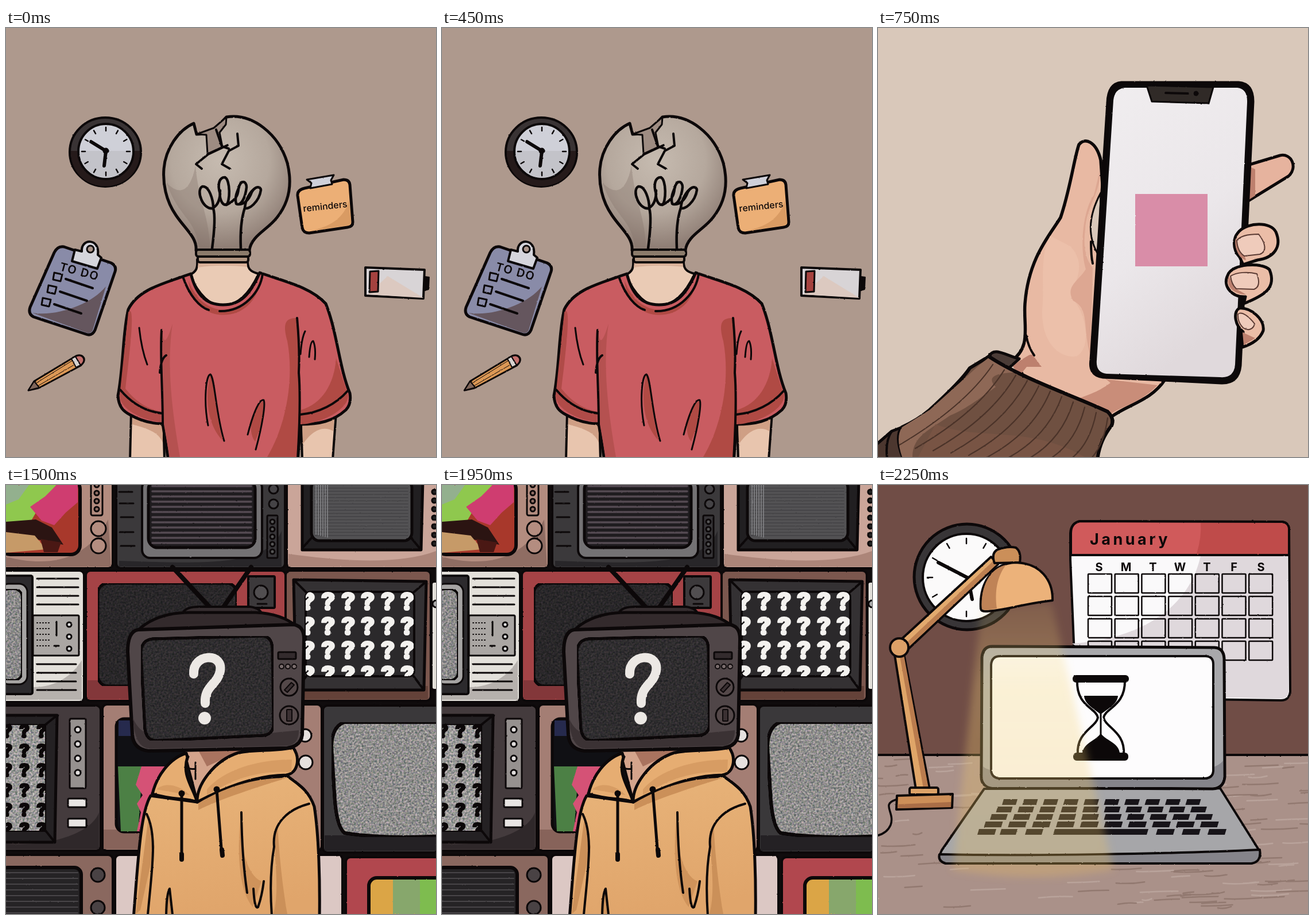
Recreate the animation shown at these times as an HTML page. Size 749 px wide and 747 px high, loop 3000 ms.

```html
<!DOCTYPE html>
<html lang="en">
<head>
<meta charset="utf-8">
<style>
html, body { margin: 0; width: 100%; height: 100%; overflow: hidden; }
svg { display: block; width: 100vw; height: 100vh; }
.scene { stroke: #0c0809; stroke-linecap: round; stroke-linejoin: round; filter: url(#rough); }
text { fill: #0c0809; stroke: none; text-anchor: middle; font-family: Inter, "Noto Sans", sans-serif; }
</style>
</head>
<body>
<svg id="stage" viewBox="0 0 749 747"></svg>
<script>
const path = (d, fill = 'none', w = 4, extra = '') =>
  `<path d="${d}" fill="${fill}" stroke-width="${w}" ${extra}/>`;
const shade = (d, fill) => path(d, fill, 0);
const box = (x0, y0, x1, y1, fill, r = 8, w = 4, extra = '') =>
  `<rect x="${x0}" y="${y0}" width="${x1 - x0}" height="${y1 - y0}" rx="${r}" fill="${fill}" stroke-width="${w}" ${extra}/>`;
const dot = (x, y, r, fill, w = 3) =>
  `<circle cx="${x}" cy="${y}" r="${r}" fill="${fill}" stroke-width="${w}"/>`;
const label = (s, x, y, size, extra = '') =>
  `<text x="${x}" y="${y}" font-size="${size}" ${extra}>${s}</text>`;
const repeat = (n, make) => Array.from({ length: n }, (_, i) => make(i)).join('');
const rules = (x0, x1, y, step, n, w = 3) =>
  path(repeat(n, i => `M${x0} ${y + i * step}H${x1}`), 'none', w);
const ticks = (x, y, r, len) => path(repeat(12, i => {
  const c = Math.cos(i * Math.PI / 6), s = Math.sin(i * Math.PI / 6);
  return `M${x + r * c} ${y + r * s}L${x + (r - len) * c} ${y + (r - len) * s}`;
}), 'none', 2.5);
const snow = 'filter="url(#snow)"';

let seed = 7;
const random = () => (seed = seed * 16807 % 2147483647) / 2147483647;

const defs = `<defs>
  <filter id="rough" filterUnits="userSpaceOnUse" x="0" y="0" width="749" height="747" color-interpolation-filters="sRGB">
    <feTurbulence type="fractalNoise" baseFrequency=".2" numOctaves="2"/>
    <feDisplacementMap in="SourceGraphic" scale="1.8" xChannelSelector="R" yChannelSelector="G"/>
  </filter>
  <filter id="snow" x="0" y="0" width="1" height="1" color-interpolation-filters="sRGB">
    <feTurbulence type="fractalNoise" baseFrequency=".3" numOctaves="3"/>
    <feColorMatrix values="1 0 0 0 0 .8 .2 0 0 0 .8 0 .2 0 0 0 0 0 0 1"/>
    <feComposite in2="SourceGraphic" operator="arithmetic" k1="1.3" k3=".35"/>
  </filter>
  <filter id="soft"><feGaussianBlur stdDeviation="7"/></filter>
  <radialGradient id="glass" cx=".45" cy=".33" r=".65">
    <stop offset="0" stop-color="#c6bbb0"/><stop offset=".6" stop-color="#b5a89d"/><stop offset="1" stop-color="#8f7e75"/>
  </radialGradient>
  <linearGradient id="screen" x2=".4" y2="1"><stop stop-color="#f0edef"/><stop offset=".6" stop-color="#ebe7ea"/><stop offset="1" stop-color="#e0d9dc"/></linearGradient>
  <linearGradient id="cloth" x2=".2" y2="1"><stop stop-color="#e8b47a"/><stop offset="1" stop-color="#e0a56b"/></linearGradient>
  <linearGradient id="beam" x2="0" y2="1"><stop stop-color="#f5d67a" stop-opacity=".12"/>
    <stop offset=".3" stop-color="#f5d67a" stop-opacity=".3"/><stop offset="1" stop-color="#f0c05c" stop-opacity=".28"/></linearGradient>
  <clipPath id="marksA"><rect x="522" y="186" width="188" height="147" rx="9"/></clipPath>
  <clipPath id="marksB"><rect x="-9" y="416" width="79" height="188" rx="9"/></clipPath>
  <clipPath id="cuff"><path d="M193 572C250 610 340 640 400 668Q412 680 407 692L383 747H42Q30 712 42 695L90 665Z"/></clipPath>
</defs>`;

// Broken bulb
const wallClock = `
  <ellipse cx="173" cy="216" rx="62" ry="60" fill="#393334" stroke-width="4"/>
  ${shade('M113 214H233C234 296 112 296 113 214Z', '#251a1a')}
  ${dot(174, 215, 48, '#cfd0d8', 4)}${shade('M128 214H220C216 276 132 276 128 214Z', '#c3c3c9')}
  ${ticks(174, 215, 42, 6)}${path('M174 214L148 198M174 214L171 240', 'none', 6)}${dot(174, 214, 5, '#0c0809', 1)}`;

const clipboard = `
  ${path('M101 381L183 409Q193 414 190 424L155 526Q150 537 139 533L48 503Q38 498 42 486L84 391Q90 379 101 381Z', '#898ba8', 5)}
  ${shade('M46 496C90 503 150 480 174 450L151 526Q148 533 139 530Z', '#65565e')}
  ${path('M115 406L120 386L132 389C130 366 164 365 160 395L166 400L159 419Z', '#d5d5dc')}${dot(147, 385, 6, '#aa9489')}
  ${label('TO DO', 128, 431, 20, 'transform="rotate(15 128 424)" font-weight="600" letter-spacing="1.5"')}
  ${repeat(3, i => { const x = 84 - i * 10, y = 426 + i * 22; return path(`M${x} ${y}L${x + 14} ${y + 3}L${x + 11} ${y + 15}L${x - 2} ${y + 12}Z`, 'none', 3)
    + path(`M${x + 20} ${y + 11}L${x + 67} ${y + 27}`, 'none', 4); })}`;

const desktopItems = `
  ${path('M520 279L588 264Q598 264 599 273L604 338Q604 346 595 347L528 357Q518 357 516 348L508 292Q507 282 520 279Z', '#ecaf76', 5)}
  ${shade('M597 300L601 337Q601 343 594 344L530 353C563 347 590 331 597 300Z', '#d99b63')}
  ${path('M524 264L571 256L566 265L568 272L530 279L532 270Z', '#cfd0d9', 3)}
  ${label('reminders', 556, 316, 16, 'transform="rotate(-6 556 311)" font-weight="500"')}
  ${path('M626 417L729 421L727 471L626 466Z', '#d8d4d6')}${shade('M665 432L727 470L630 464Z', '#dcc9c0')}
  ${path('M634 424L649 423L648 459L633 460Z', '#a5423f', 3)}${path('M730 433L737 434L736 455L729 457Z', '#0c0809', 2)}
  ${path('M39 631L49 615L122 571Q132 567 136 575Q138 581 130 588L57 627Z', '#dc9855', 3)}
  ${path('M39 631L49 615L58 626Z', '#80665a', 2)}${path('M53 618L119 577M56 623L123 584', 'none', 1)}
  ${path('M114 576L121 572L130 587L122 591Z', '#d6d2cf', 2)}${path('M121 572C132 566 142 578 130 587Z', '#c4706d', 2)}`;

const shirt = `
  ${path('M218 668L216 752H276L274 680Z', '#e8c5ae')}${shade('M220 675L273 690V722C265 700 235 695 220 690Z', '#cf9f85')}
  ${path('M514 680L516 752H569L575 670Z', '#e8c5ae')}${shade('M516 690L572 677L570 702C550 690 530 705 517 725Z', '#cf9f85')}
  ${path('M333 403C334 418 332 424 320 430Q345 484 378 484Q415 482 440 428C424 424 420 418 421 403Z', '#eacbb5')}
  ${shade('M335 405H419L420 416C390 413 360 413 334 417Z', '#d9b199')}
  ${path('M310 432C275 445 230 455 213 490C203 530 205 590 195 640C196 660 205 668 217 674C235 684 255 689 273 689Q278 720 283 755H508L513 690C545 690 570 685 592 665Q602 655 599 636C580 590 577 530 557 480C530 450 480 440 442 426C425 465 408 482 378 482C345 482 330 460 322 428Z', '#c95c61', 5)}
  ${shade('M213 495C224 480 219 540 208 628C230 655 250 664 270 668V686C240 684 198 664 198 640Z', '#b04b48')}
  ${shade('M272 527Q275 565 290 515C279 590 290 670 303 747H285L275 690Z', '#b55150')}
  ${shade('M507 505C490 505 480 510 490 545C502 610 489 690 455 747H507L512 690C545 690 596 666 596 640L575 575C572 620 550 655 514 665Z', '#b04a44')}
  ${shade('M356 604C346 640 350 690 377 718C365 670 363 620 356 604ZM449 649C431 657 418 700 434 720C446 690 451 670 449 649Z', '#b04a44')}
  ${shade('M318 440C332 476 356 492 385 491C418 486 438 458 445 435C437 484 402 506 364 498C336 491 320 466 318 440Z', '#b04a44')}
  ${path('M308 433C320 468 338 486 353 491M372 493C415 494 443 459 447 428')}
  ${path('M199 630C220 655 245 668 272 671M513 673C545 670 575 655 595 632M271 526C268 570 273 630 273 689M268 600Q270 575 279 570M507 505Q512 560 510 600Q514 650 508 750')}
  ${path('M232 522Q236 560 246 586M380 719C365 670 364 610 356 603C348 605 344 650 352 692M435 734C447 690 452 655 449 648C440 645 428 680 421 708M528 573Q530 545 535 545Q540 555 538 577M513 568Q515 540 521 528', 'none', 3)}`;

const bulb = `
  ${path('M331 387C333 365 312 350 296 326C278 300 273 270 275 245C278 210 300 178 327 166L332 185L349 184L364 176L384 155C430 148 475 185 490 235C500 275 492 305 472 330C455 352 427 362 424 387Z', 'url(#glass)', 5)}
  ${shade('M280 270C300 330 330 330 337 385H355C355 330 335 300 330 240C320 290 300 290 280 270Z', 'rgba(130,112,103,.35)')}
  ${path('M332 185L349 186L351 219L377 207L372 182L383 168L384 155L362 174Z', '#9e8c82', 3)}
  ${path('M386 204L352 220L331 237L341 245M366 177L376 206L388 210M403 184L405 205L388 214L376 237L390 245')}
  ${path('M359 384Q366 330 361 314C343 318 330 282 342 276C354 274 361 300 361 313C370 308 372 298 373 289C367 270 373 260 381 260C391 263 391 305 383 308C375 308 371 294 373 283M384 308C400 300 404 292 405 280C408 263 419 266 419 277C417 296 409 311 401 306C398 296 402 286 406 277M403 307C414 308 423 300 428 286C434 275 443 275 444 282C441 303 422 318 416 313C417 299 426 284 434 279M416 313Q407 340 409 384', 'none', 4.5)}
  ${box(334, 397, 422, 408, '#b0947f', 4)}${box(331, 386, 425, 398, '#8b7b6b', 4)}`;

// Phone in hand
const finger = (d, nail, fold) => path(d, '#ebbda7', 5) + shade(fold, '#bd806e') + path(nail, '#efcbbb', 2, 'stroke="#5a3a33"');

const hand = `
  ${path('M640 240L700 222C720 217 732 243 715 258L640 304Z', '#e6b39e', 5)}${shade('M646 241L657 246V292L646 299Z', '#bd806e')}
  ${path('M232 580C268 555 253 520 256 480C262 400 300 360 318 330C335 280 342 225 350 203C360 190 380 197 388 230L400 400L500 612C475 650 435 655 405 678L270 625Z', '#e8b9a3', 5.5)}
  ${shade('M335 380C372 420 328 455 342 475C365 505 371 560 345 572C310 575 280 540 287 478C289 440 282 395 300 362Z', '#ecc0aa')}
  ${shade('M386 250C389 285 363 310 361 350Q355 395 374 418L370 570C355 520 370 490 340 475C325 450 350 440 362 420C350 380 358 315 376 291Z', '#dda792')}
  ${shade('M372 590L400 612L487 622C455 655 420 660 404 673L342 647C380 636 395 625 405 618Z', '#c98d79')}
  ${shade('M234 588C256 575 265 565 270 570L285 590L259 590L246 606Z', '#bd806e')}
  ${path('M388 287C365 330 365 365 385 397Z', '#d9c8ba', 3)}${path('M371 372Q371 398 374 410M258 535Q262 556 272 570', 'none', 4)}`;

const phone = `
  ${path('M424 96H628Q652 98 652 128L630 588Q627 618 598 617L392 607Q368 604 372 578L401 130Q402 98 424 96Z', '#0d0a0b', 7)}
  ${shade('M430 104H626Q644 106 643 130L622 586Q620 610 596 608L398 602Q379 600 381 578L410 126Q412 106 430 104Z', 'url(#screen)')}
  ${path('M468 100L584 103L576 131L477 128Z', '#302a27', 3)}${path('M501 113L540 114', 'none', 4)}${dot(554, 114, 4, '#0c0809', 1)}
  ${box(448, 289, 574, 415, '#d98da8', 0, 0)}`;

const fingers = `
  ${finger('M636 412L630 399C617 385 618 365 629 354C645 338 684 337 693 355C704 381 690 400 661 404Z', 'M625 370C632 360 652 359 663 359C674 373 679 389 665 394L638 397Q626 389 625 370Z', 'M623 366C619 382 630 404 641 404L637 392Z')}
  ${finger('M637 480L640 468C615 469 600 448 609 431C615 410 670 407 682 421C695 453 672 466 637 480Z', 'M614 432C625 425 644 424 660 428Q668 450 655 455L624 454Q616 447 614 432Z', 'M611 432C605 447 617 464 641 464L620 452Z')}
  ${finger('M634 556L636 529C622 518 618 496 629 488C649 486 674 507 671 527C665 543 650 551 634 556Z', 'M627 498C634 493 646 502 656 515C654 525 644 528 636 522Q626 512 627 498Z', 'M635 530L657 540L637 552Z')}`;

const sleeve = `
  ${path('M-6 728L24 702L45 694L50 752H-6Z', '#4c372f', 5)}${path('M24 702Q12 720 16 750', 'none', 4)}
  ${path('M193 572C202 554 222 570 246 576L228 592L262 618Z', '#4b3c37', 5)}
  ${path('M193 572C250 610 340 640 400 668Q412 680 407 692Q385 720 382 754H46Q28 712 42 695Q70 682 90 665Q145 615 160 592Z', '#6f5041', 6)}
  <g clip-path="url(#cuff)">${shade('M193 574L240 600C200 600 190 610 205 625C170 650 150 665 125 675C90 700 60 710 60 747H30V700Z', '#8e6856')}
  ${shade('M100 690C180 720 260 690 360 747H70Z', '#785444')}
  ${repeat(13, i => `<path d="M${200 + i * 20} ${586 + i * 9.3}Q${150 + i * 24} ${660 + i * 9} ${34 + i * 31} ${728 + i * 4}" fill="none" stroke="#4b3329" stroke-width="2.2"/>`)}</g>
  ${path('M193 572C250 610 340 640 400 668Q412 680 407 692', 'none', 6)}`;

// Wall of televisions
const knobs = (x, y, step, n, r, fill) => repeat(n, i => dot(x, y + i * step, r, fill));
const marks = (clip, xs, ys, size, fill) => `<g clip-path="url(#${clip})">` + ys.map(y => xs.map(x =>
  label('?', x, y, size, `font-weight="900" style="fill:${fill};stroke:${fill};stroke-width:2"`)).join('')).join('') + '</g>';

const topRow = `
  ${box(-9, -9, 186, 145, '#b38c7f')}${shade('M0 125C70 143 140 135 178 60L183 142H0Z', '#8f6d63')}
  ${box(-9, -9, 129, 121, '#a8382b', 16, 6)}${shade('M0 0H88L66 24L44 62L0 66Z', '#8fc84e')}${shade('M0 0H40L22 25L0 34Z', '#93b08e')}
  ${shade('M88 0H125V30L104 48L84 70L62 62L42 38L68 20Z', '#cf3d70')}${shade('M0 64L52 60L80 74L100 104L60 96L0 82Z', '#2b1412')}
  ${shade('M0 82L50 88L70 112L0 118Z', '#c69a68')}${shade('M60 94L96 100L90 117H66Z', '#4a1814')}
  ${box(148, -9, 168, 53, '#b38c7f', 3, 3)}${knobs(158, 0, 14, 4, 4, '#8f6d63')}${knobs(161, 76, 30, 2, 13, '#b48d80')}
  ${box(192, -9, 486, 145, '#3b393b')}${shade('M197 132C350 137 455 142 480 80V142H197Z', '#282629')}${box(237, -9, 446, 127, '#747274', 14)}
  ${box(248, -9, 434, 109, '#1f1c1f', 16, 5)}
  ${path(repeat(12, i => `M255 ${2 + i * 9}H427`), 'none', 3.5, 'stroke="#544a52"')}
  ${path('M198 12H220M198 32H222M200 56H222M198 82H222M200 106H224', 'none', 3)}
  ${knobs(466, 7, 26, 2, 8, '#454346')}${box(455, 53, 473, 127, '#373538', 2, 3)}${knobs(464, 64, 13, 5, 4, '#555')}
  ${box(489, -9, 760, 145, '#caa599')}${shade('M492 120C600 135 690 137 749 115V142H492Z', '#ac8579')}
  ${path('M516 -8H726L723 113H516Z', '#211f21', 5)}${path('M516 110L534 90M723 113L704 90')}
  ${box(532, -9, 707, 97, '#535254', 14, 5)}${path(repeat(17, i => `M538 ${i * 5.5}H700`), 'none', 1.5, 'stroke="#434244"')}
  ${path(repeat(6, i => `M${540 + i * 4} 0V${86 + i}`), 'none', 1.5, 'stroke="#88888a"')}${knobs(746, 12, 15, 7, 4, '#222')}`;

const middleRow = `
  ${box(-9, 149, 136, 378, '#e3e0da')}${shade('M0 345C70 365 110 340 132 305V374H0Z', '#b6b1ad')}${box(-9, 158, 46, 364, '#2c2a2d', 3)}
  ${box(-9, 172, 37, 347, '#a6a4a3', 14, 3)}${box(-9, 181, 28, 340, '#8b8a8a', 14, 4, snow)}
  ${rules(54, 126, 163, 15, 4)}${rules(54, 122, 312, 15, 4)}${box(47, 227, 127, 297, '#aaa6a3', 2, 3)}
  ${repeat(5, i => rules(54 + i * 5, 55 + i * 5, 240, 10, 5, 2))}${path('M88 238V262M84 280H92', 'none', 3)}${knobs(110, 243, 21, 3, 4, '#ddd')}
  ${box(139, 149, 487, 376, '#a54346')}${shade('M142 340H215V373H142Z', '#83373a')}${box(160, 171, 402, 350, '#292729', 18, 5, snow)}
  ${box(422, 159, 468, 214, '#3c393b', 2)}${dot(444, 187, 12, '#514e50')}${path('M438 207H454', 'none', 3)}
  ${box(487, 149, 740, 376, '#7b574e')}${shade('M490 350H735V373H490Z', '#644239')}${path('M501 165L732 168L728 357H505Z', '#343133', 5)}
  ${path('M501 165L523 187M732 168L710 187M728 357L710 333M505 357L523 333')}${box(522, 186, 711, 333, '#2b292b', 9)}
  ${marks('marksA', [526, 561, 596, 630, 665, 699], [218, 261, 303, 346], 42, '#f4f2ef')}
  ${box(741, 168, 780, 357, '#e3e0da', 5)}${dot(749, 207, 6, '#aaa')}`;

const lowRows = `
  ${box(-9, 384, 165, 637, '#443b3d')}${shade('M0 625C80 630 150 605 162 570V634H0Z', '#2f282a')}${path('M-9 401H89L85 622H-9Z', '#242123', 5)}
  ${path('M89 401L69 417M85 622L69 602')}${box(-9, 416, 70, 604, '#9a9998', 9, 4, snow)}
  ${marks('marksB', [2, 32, 62], [440, 474, 508, 543, 577, 611], 31, '#0c0809')}
  ${box(111, 407, 139, 528, '#96918f', 2, 3)}${knobs(125, 426, 25, 4, 5, '#e0dddc')}${box(108, 546, 140, 561, '#e8e5e3', 2, 3)}${box(108, 581, 140, 596, '#e8e5e3', 2, 3)}
  ${box(168, 382, 550, 637, '#a47e74')}${shade('M170 600H300V634H170Z', '#87635a')}${box(192, 407, 460, 604, '#101014', 14, 5)}
  ${shade('M196 410H250V437H196Z', '#262a4d')}${shade('M195 490H238L230 603H200Z', '#4c8045')}${shade('M236 490H280L255 545L245 603H228L235 570L228 555L238 540L226 522Z', '#d55276')}
  ${dot(521, 436, 11, '#e6e1de')}${dot(522, 483, 12, '#e6e1de')}
  ${box(552, 384, 770, 640, '#3a383a')}${shade('M555 610H749V637H555Z', '#242124')}
  ${path('M590 413H760V611C690 615 630 612 590 606Q575 595 572 535L567 455Q568 420 590 413Z', '#8f8e8d', 6, snow)}
  ${box(-9, 644, 186, 760, '#8a685f')}${box(-9, 666, 131, 760, '#252325', 12, 6)}
  ${path(repeat(8, i => `M0 ${675 + i * 10}H125`), 'none', 2, 'stroke="#484548"')}${knobs(160, 679, 57, 2, 12, '#494244')}
  ${box(190, 644, 586, 760, '#dcc8c4')}${box(592, 648, 770, 760, '#b1474e')}${box(632, 684, 770, 760, '#dba546', 14, 6)}
  ${shade('M674 687H749V747H674Z', '#87a76c')}${shade('M721 687H749V747H721Z', '#7ebc4f')}`;

const hoodie = `
  ${path('M310 462H405L333 550Z', '#d4a48c')}${shade('M335 462H410L350 490Z', '#a9735f')}
  ${path('M252 541C234 570 230 655 222 755H546C547 690 545 610 537 560C526 528 506 520 488 505L333 552Z', 'url(#cloth)', 5)}
  ${path('M314 467C284 476 262 508 255 538C290 549 315 545 333 552C325 525 306 505 316 474Z', '#e6ad72', 5)}
  ${path('M333 552C332 522 362 480 405 466C440 460 470 464 500 457C513 475 509 502 488 505C430 506 375 530 333 552Z', '#e6ad72', 5)}
  ${path('M318 473Q308 498 330 494V512M330 483V494', 'none', 3)}
  ${shade('M335 554C390 521 440 510 490 510C440 525 370 548 335 566ZM473 590C460 630 480 690 466 747H490C480 690 475 630 473 590ZM248 580L259 630L234 740L226 747Z', '#cb9059')}
  ${shade('M350 530C380 495 440 478 498 478L497 500C440 496 395 512 350 540ZM262 530C275 518 300 520 320 540Z', '#d79c63')}
  ${shade('M410 570C406 630 420 680 445 690L430 735C400 700 404 610 410 570ZM285 703C275 720 275 735 280 747H288Z', '#cf935b')}
  ${path('M528 555C490 565 463 590 467 630Q458 680 463 750M245 573C264 610 254 670 247 748M410 570Q411 650 420 710M431 703Q433 740 439 735Q446 715 449 690M279 748Q280 710 285 703L290 748', 'none', 4)}
  ${path('M306 537V652M367 530L376 645', 'none', 5)}${path('M306 643V652M376 635L377 645', 'none', 8)}${dot(306, 537, 4, '#0c0809')}${dot(367, 530, 4, '#0c0809')}`;

const tvHead = `
  ${path('M290 143L357 215M427 143L377 215', 'none', 8)}
  ${path('M308 222Q315 211 340 212H425Q442 214 446 225Z', '#352d2f')}
  ${path('M231 252C255 230 285 222 320 222H435Q480 224 506 246Z', '#332a2c', 5)}
  ${path('M230 252L500 243Q520 245 519 270L516 435Q513 455 490 458L248 463Q222 460 220 435L212 290Q212 255 230 252Z', '#504648', 6)}
  ${shade('M221 405C240 455 300 448 510 427Q510 452 490 454L250 459Q224 458 221 405Z', '#3b3234')}
  ${path('M255 268L447 263Q463 264 464 285L466 418Q464 435 447 436L262 445Q245 445 242 425L235 290Q237 270 255 268Z', '#2f2d2f', 5, snow)}
  ${path('M327 329C325 293 379 291 373 324C369 347 345 350 347 380', 'none', 16, 'stroke="#ece8e4"')}
  <circle cx="346" cy="406" r="11" fill="#ece8e4" stroke="none"/>
  ${box(474, 291, 505, 303, '#332b2d', 2, 3)}${repeat(3, i => dot(480 + i * 11, 316, 4, '#7a6d6d', 2))}
  ${dot(493, 352, 15, '#544849')}${path('M485 357L497 344L502 348L490 361Z', '#3a3032', 2)}${dot(493, 401, 16, '#544849')}${box(489, 391, 498, 411, '#3a3032', 1, 2)}`;

// Late night desk
const desk = `
  ${box(-5, 470, 755, 755, '#aa9189', 0)}
  ${repeat(150, i => {
    const x = random() * 770 - 30, y = 478 + random() * 265, len = 15 + random() * 55;
    return `<path d="M${x} ${y}q${len / 2} ${random() * 6 - 3} ${len} -2" fill="none" stroke="${i % 3 ? '#927970' : '#b9a39b'}" stroke-width="2.5"/>`;
  })}`;

const calendar = `
  ${path('M352 63L704 64Q716 66 716 78L718 360Q716 375 702 375L345 370L335 130V84Q336 66 352 63Z', '#faf9fa')}
  ${shade('M562 123H713L715 360Q714 372 702 372L480 367L338 276C440 270 540 225 562 123Z', '#dfd8dc')}
  ${path('M352 63L704 64Q716 66 716 78V122H336V84Q336 66 352 63Z', '#d05a5b')}
  ${shade('M562 66H703Q714 67 714 78V120H555Q564 90 562 66Z', '#bf4b4a')}
  ${label('January', 439, 104, 27, 'font-weight="700" letter-spacing="4.5"')}
  ${[...'SMTWTFS'].map((day, i) => label(day, 385 + i * 47, 150, 20, 'font-weight="700"')).join('')}
  ${repeat(28, i => { const x = 366 + i % 7 * 46.7, y = 155 + Math.floor(i / 7) * 39; return box(x, y, x + 41, y + 33, 'none', 1, 2.5); })}`;

const clock = `${dot(155, 160, 92, '#383537', 5)}${dot(154, 161, 76, '#fbfafa', 4)}${ticks(154, 161, 68, 9)}
  ${path('M157 162L105 135M157 162L164 199', 'none', 6)}`;

const key = (x, y, w) => shade(`M${x + 3} ${y}h${w}l-3 10h${-w}Z`, '#171419');
const laptop = `
  ${path('M185 529L111 636Q102 655 118 659H650Q668 655 665 638L596 528Z', '#a6a6a9')}
  ${path('M107 643C250 646 500 643 665 635Q668 657 650 659L118 659Q104 655 107 643Z', '#85848a')}
  ${path('M199 281L586 283Q602 284 603 302L604 508Q602 528 583 529L199 527Q180 525 180 508L181 300Q183 281 199 281Z', '#a8a8ab', 5)}
  ${shade('M183 490C205 516 570 526 601 480V508Q600 525 583 526H199Q183 524 183 508Z', '#85848a')}
  ${path('M213 298H570Q584 298 584 312V498Q583 511 568 511H211Q197 509 197 496V313Q198 298 213 298Z', '#fdfcfd')}
  ${repeat(4, r => repeat(10, i => key(216 - r * 10.5 + i * (35.5 + r * 2.1), 547 + r * 13, 24 + r * 2)))}
  ${key(173, 599, 30)}${key(212, 599, 28)}${key(256, 599, 29)}${key(305, 599, 163)}${key(484, 599, 30)}${key(529, 599, 30)}${key(574, 599, 30)}
  ${path('M347 340C345 385 380 388 383 405C380 422 345 430 348 469H428C431 430 396 422 393 405C396 388 431 385 430 340Z', '#fdfcfd')}
  ${path('M360 368H417C415 382 398 390 388 398C378 390 362 382 360 368ZM357 466C360 449 380 446 388 434C397 446 417 449 420 466Z', '#0c0809', 2)}
  ${path('M388 395V440', 'none', 3)}${box(341, 333, 435, 342, '#0c0809', 4)}${box(342, 468, 434, 478, '#0c0809', 4)}`;

const lamp = `
  <path d="M180 214L302 204L410 670Q270 695 130 670Z" fill="url(#beam)" stroke="none" filter="url(#soft)"/>
  ${path('M31 548C5 556 30 570 22 592Q15 608 -5 611', 'none', 3.5)}
  ${path('M29 296L45 294L90 530H66Z', '#dfa568')}${shade('M38 298L45 296L88 528H79Z', '#ba7c4e')}
  ${box(55, 527, 105, 539, '#dda368', 3)}${path('M33 541L130 538L129 562L32 565Z', '#cd8f58')}${shade('M34 556L127 552V561L34 563Z', '#aa6e47')}
  ${path('M37 272L197 125L209 138L48 290Z', '#e2aa6e')}${shade('M49 286L207 138L200 133L44 280Z', '#bd8051')}
  ${dot(37, 283, 16, '#dca067', 4)}${path('M203 136Q197 120 207 113Q225 106 240 109Q250 116 247 135Z', '#cb8f59')}
  ${path('M179 216C176 170 200 136 240 135C282 136 305 165 304 201C250 207 220 219 188 220Q180 220 179 216Z', '#ecb27a')}
  ${shade('M181 216C178 175 196 145 223 139C207 160 203 186 207 215L188 218Z', '#bf8356')}`;

const scenes = [
  ['#ae998d', wallClock + clipboard + desktopItems + shirt + bulb],
  ['#d9c8ba', hand + phone + fingers + sleeve],
  ['#100c0d', topRow + middleRow + lowRows + hoodie + tvHead],
  ['#704d46', desk + calendar + clock + laptop + lamp],
];
const stage = document.getElementById('stage');
stage.innerHTML = defs + scenes.map(([back, art]) =>
  `<g class="scene">${box(-9, -9, 760, 760, back, 0, 0)}${art}</g>`).join('');

const groups = stage.querySelectorAll('.scene');
function draw() {
  const current = Math.floor(performance.now() % 3000 / 750);
  groups.forEach((g, i) => { g.style.display = i === current ? '' : 'none'; });
  requestAnimationFrame(draw);
}
draw();
</script>
</body>
</html>
```
